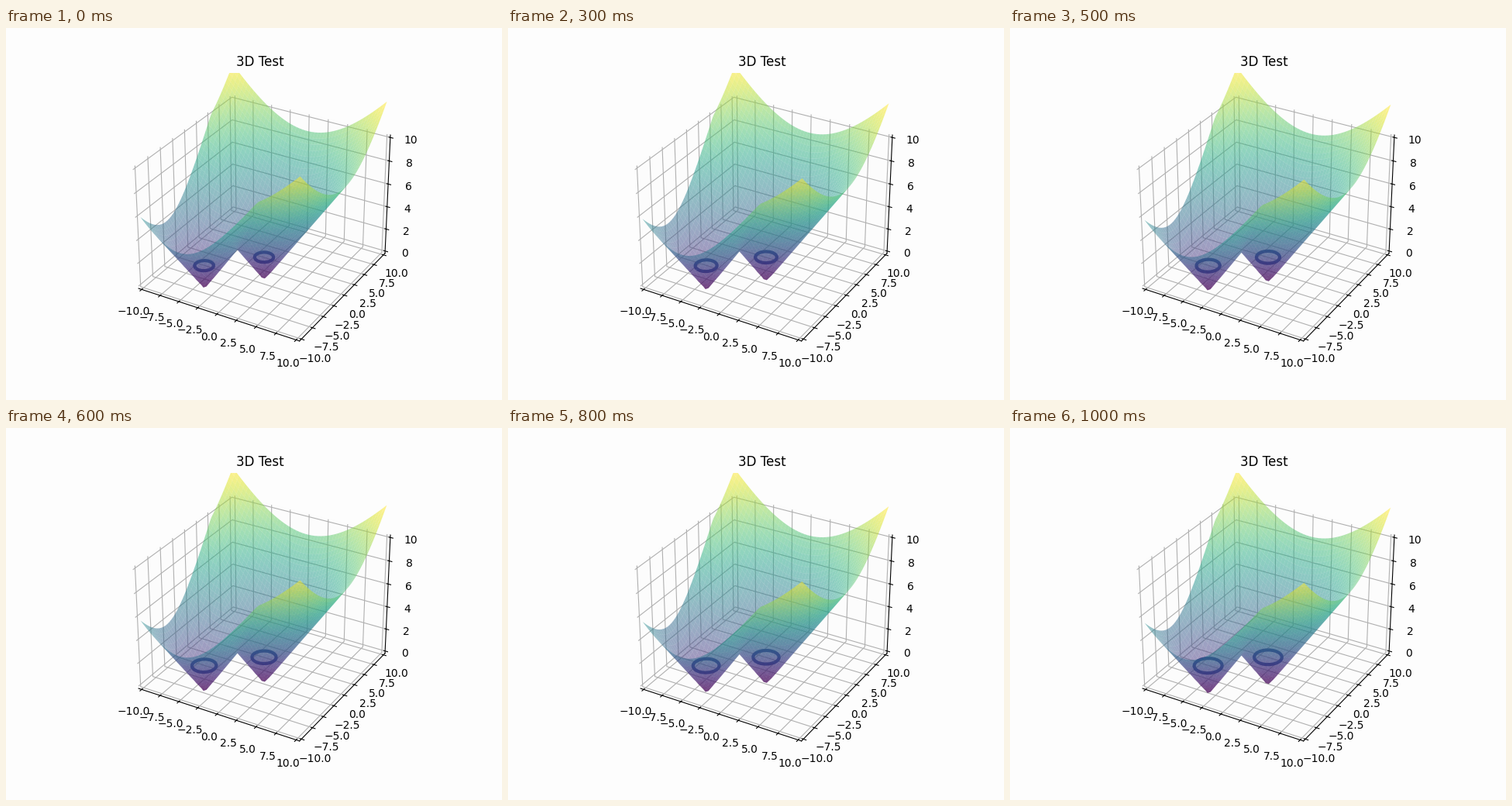
A matplotlib script that plays this animation: 640x480 px, repeating every 1100 ms.

```python
import matplotlib.pyplot as plt
import numpy as np
from matplotlib.animation import FuncAnimation

FRAMES, STEP_MS = 11, 100
CENTERS = [(-5, -5), (0, 0)]
PAPER = "#fdfdfd"
RING = "#2f4b8e"

fig = plt.figure(figsize=(6.4, 4.8), dpi=100, facecolor=PAPER)
ax = fig.add_subplot(projection="3d", facecolor=PAPER)
ax.set_title("3D Test")


def padded(lo, hi):
    pad = (hi - lo) / 48
    return lo - pad, hi + pad


ax.set_xlim(*padded(-10, 10))
ax.set_ylim(*padded(-10, 10))
ax.set_zlim(*padded(0, 10))
ax.set_xticks(np.arange(-10, 10.1, 2.5))
ax.set_yticks(np.arange(-10, 10.1, 2.5))
ax.set_zticks(np.arange(0, 10.1, 2))
ax.set_autoscale_on(False)
for axis in (ax.xaxis, ax.yaxis, ax.zaxis):
    axis.set_pane_color((0.99, 0.99, 0.99, 0.5))

side = np.linspace(-10, 10, 50)
X, Y = np.meshgrid(side, side)
distance = np.min([np.hypot(X - cx, Y - cy) for cx, cy in CENTERS], axis=0)

drawn = []


def update(i):
    while drawn:
        drawn.pop().remove()
    # signed distance to two growing circles
    phi = distance - (1.1 + 0.05 * i)
    drawn.append(ax.plot_surface(X, Y, phi, cmap="viridis", alpha=0.5,
                                 linewidth=0, edgecolor="none"))
    # zero level set, lifted to z = 1
    drawn.append(ax.contour(X, Y, phi, levels=[0], offset=1,
                            colors=[RING], linewidths=3))
    return []


anim = FuncAnimation(fig, update, frames=FRAMES, interval=STEP_MS,
                     init_func=lambda: [], repeat=True, repeat_delay=0)
plt.show()
```
